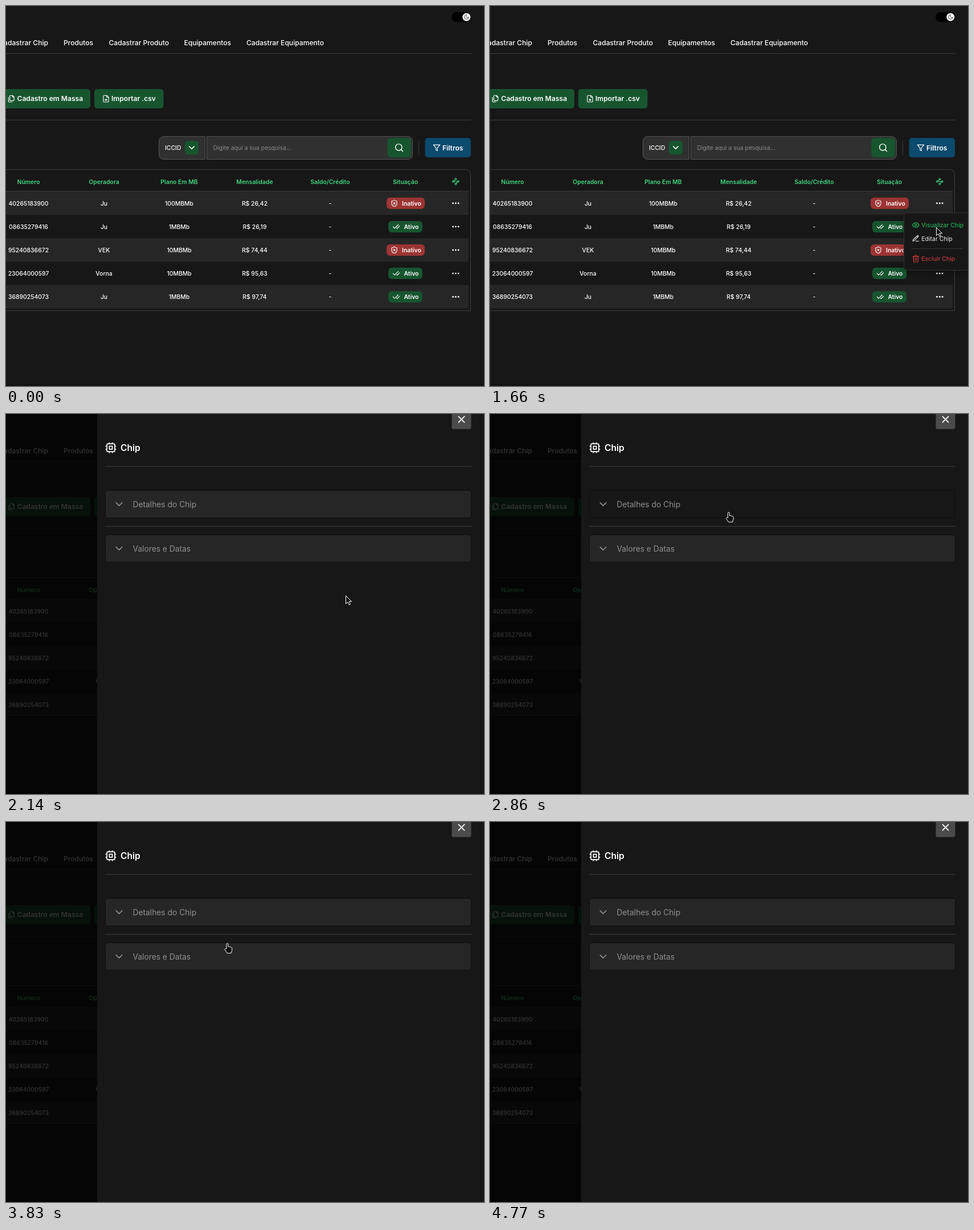
Write an HTML page that moves like this. It is 839x668 px and loops after 5.82 s.

```html
<!DOCTYPE html>
<html lang="pt-BR">
<head>
<meta charset="utf-8">
<title>Chips</title>
<style>
  html, body { margin: 0; width: 100%; height: 100%; overflow: hidden; background: #171717; }
  svg { display: block; font-family: Inter, sans-serif; }
  text { white-space: pre; }
  #menu { filter: drop-shadow(0 4px 5px #0004); }
</style>
</head>
<body>
<svg id="stage" width="839" height="668" viewBox="0 0 839 668"></svg>
<script>
const LOOP = 5820, GREEN = '#17552f', MINT = '#42d67d', LINE = '#3d3d3d';
const DETAILS_HEIGHT = 470, VALUES_HEIGHT = 225, SCROLLBAR = 15;
const $ = id => document.getElementById(id);

// Drawing helpers
const ring = (x, y, r) => `M${x - r} ${y}a${r} ${r} 0 1 0 ${2 * r} 0a${r} ${r} 0 1 0 ${-2 * r} 0`;
const text = (x, cy, str, size = 10.4, weight = 500, fill = '#fff', anchor = 'start', extra = '') =>
  `<text x="${x}" y="${cy + size * .364}" font-size="${size}" font-weight="${weight}" fill="${fill}" text-anchor="${anchor}" ${extra}>${str}</text>`;
const box = (x, y, w, h, fill, r = 0, extra = '') =>
  `<rect x="${x}" y="${y}" width="${w}" height="${h}" rx="${r}" fill="${fill}" ${extra}/>`;
const wide = (x, y, w, h, fill, r = 0, extra = '') => box(x, y, w, h, fill, r, `data-w="${w}" ${extra}`);
const icon = (name, cx, cy, size, color = '#fff', extra = '') =>
  `<g transform="translate(${cx - size / 2} ${cy - size / 2}) scale(${size / 24})"><path d="${ICONS[name]}" fill="none" stroke="${color}" stroke-width="2" stroke-linecap="round" stroke-linejoin="round" ${extra}/></g>`;

const ICONS = {
  chevron: 'm6 9 6 6 6-6',
  close: 'M18 6 6 18M6 6l12 12',
  search: ring(11, 11, 8) + 'M21 21l-4.3-4.3',
  filter: 'M22 3H2l8 9.46V19l4 2v-8.54z',
  eye: 'M2 12s3-7 10-7 10 7 10 7-3 7-10 7-10-7-10-7Z' + ring(12, 12, 3),
  pencil: 'M12 20h9M16.5 3.5a2.12 2.12 0 0 1 3 3L7 19l-4 1 1-4ZM15 5l3 3',
  trash: 'M3 6h18M19 6v14c0 1-1 2-2 2H7c-1 0-2-1-2-2V6M8 6V4c0-1 1-2 2-2h4c1 0 2 1 2 2v2M10 11v6M14 11v6',
  cpu: 'M6 4h12a2 2 0 0 1 2 2v12a2 2 0 0 1-2 2H6a2 2 0 0 1-2-2V6a2 2 0 0 1 2-2ZM9 9h6v6H9zM15 2v2M15 20v2M2 15h2M2 9h2M20 15h2M20 9h2M9 2v2M9 20v2',
  files: 'M20 7h-3a2 2 0 0 1-2-2V2M9 18a2 2 0 0 1-2-2V4a2 2 0 0 1 2-2h7l4 4v10a2 2 0 0 1-2 2ZM3 7.6v12.8A1.6 1.6 0 0 0 4.6 22h9.8',
  download: 'M15 2H6a2 2 0 0 0-2 2v16a2 2 0 0 0 2 2h12a2 2 0 0 0 2-2V7ZM14 2v4a2 2 0 0 0 2 2h4M12 18v-6M9 15l3 3 3-3',
  shield: 'M20 13c0 5-3.5 7.5-8 9-4.5-1.5-8-4-8-9V6a1 1 0 0 1 1-1c2 0 4.5-1.2 7-3 2.5 1.8 5 3 7 3a1 1 0 0 1 1 1zM14.5 9.5l-5 5M9.5 9.5l5 5',
  checks: 'M18 6 7 17l-5-5M22 10l-7.5 7.5L13 16',
  moon: 'M12 3a6 6 0 0 0 9 9 9 9 0 1 1-9-9Z',
  nodes: ring(12, 4.5, 2.5) + ring(4.5, 12, 2.5) + ring(19.5, 12, 2.5) + ring(12, 19.5, 2.5) + 'M10.2 6.3 6.3 10.2M7 12h10M13.8 17.7l3.9-3.9'
};

const COLUMNS = [39.5, 172, 304, 436.5, 569, 701];
const HEADERS = ['Número', 'Operadora', 'Plano Em MB', 'Mensalidade', 'Saldo/Crédito', 'Situação'];
const CHIPS = [
  ['40265183900', 'Ju', '100MBMb', 'R$ 26,42', '-', false],
  ['08635279416', 'Ju', '1MBMb', 'R$ 26,19', '-', true],
  ['95240836672', 'VEK', '10MBMb', 'R$ 74,44', '-', false],
  ['23064000597', 'Vorna', '10MBMb', 'R$ 95,63', '-', true],
  ['36890254073', 'Ju', '1MBMb', 'R$ 97,74', '-', true]
];

function badge(cy, active) {
  return active
    ? box(671, cy - 10, 60, 20, GREEN, 6) + icon('checks', 685, cy, 13.7) + text(698.5, cy, 'Ativo', 10.4, 600)
    : box(668, cy - 10, 67, 20, '#9c3434', 6) + icon('shield', 681.5, cy, 13.7) + text(695, cy, 'Inativo', 10.4, 600);
}

function tableRow(chip, i) {
  const cy = 346.8 + i * 41.1;
  const cells = chip.slice(0, 5).map((value, c) => text(COLUMNS[c], cy, value, 10.4, 500, '#fff', 'middle'));
  const dots = [784.5, 789.3, 794.1].map(x => `<circle cx="${x}" cy="${cy}" r="1.45" fill="#fff"/>`);
  return (i % 2 ? '' : box(0, cy - 20.6, 812, 41, '#262626')) + cells.join('') + badge(cy, chip[5]) + dots.join('');
}

const page = `
  ${box(0, 664, 839, 4, '#131313')}
  ${box(782, 11, 34, 17, '#000', 8.5)}<circle cx="808.3" cy="19.5" r="7" fill="#fff"/>${icon('moon', 808.3, 19.5, 10, '#171717')}
  ${text(74, 65, 'Cadastrar Chip', 12.1, 500, '#fff', 'end')}
  ${text(101, 65, 'Produtos', 12.1)}${text(180.5, 65, 'Cadastrar Produto', 12.1)}
  ${text(312.5, 65, 'Equipamentos', 12.1)}${text(422, 65, 'Cadastrar Equipamento', 12.1)}
  ${box(0, 83, 817, 1, LINE)}${box(0, 200, 816, 1, LINE)}
  ${box(-20, 146, 168, 34, GREEN, 5)}${icon('files', 9.5, 163, 13.7)}${text(19.5, 163, 'Cadastro em Massa', 12.1, 600)}
  ${box(155, 146, 121.5, 34, GREEN, 5)}${icon('download', 175.5, 163, 13.7)}${text(185, 163, 'Importar .csv', 12.1, 600)}
  <g fill="#303030" stroke="#555">
    <path d="M349.5 229.5H276.5a8 8 0 0 0-8 8v24a8 8 0 0 0 8 8h73z"/>
    <path d="M352.5 229.5h353a8 8 0 0 1 8 8v24a8 8 0 0 1-8 8h-353z"/>
  </g>
  ${text(279, 249.5, 'ICCID', 10.4)}${box(314, 237, 24, 24, GREEN, 5)}${icon('chevron', 326, 249, 17)}
  ${text(363.5, 249.7, 'Digite aqui a sua pesquisa...', 10.4, 400, '#8b8b8b')}
  ${box(669.5, 232, 41.5, 34, GREEN, 6)}${icon('search', 690, 249, 17)}
  ${box(724, 236, 1, 27, LINE)}
  ${box(735.5, 232, 80.5, 34, '#0c4a6e', 5)}${icon('filter', 756, 249.3, 13.7)}${text(766, 249.7, 'Filtros', 12.1, 600)}
  <path d="M0 287.5H807.5a8 8 0 0 1 8 8V535.5H0" fill="none" stroke="#404040"/>
  ${box(0, 325, 812, 1, LINE)}
  ${HEADERS.map((h, c) => text(COLUMNS[c], 309, h, 10.4, 600, MINT, 'middle')).join('')}
  ${icon('nodes', 789.3, 308.5, 13.7, MINT)}
  ${CHIPS.map(tableRow).join('')}`;

const menu = `<g id="menu">
  ${box(726.5, 363.5, 130, 101, '#171717', 6, 'stroke="#343434"')}
  <g id="view">${icon('eye', 747.3, 385, 13.7, 'currentColor')}${text(757.3, 385.2, 'Visualizar Chip', 10.5, 400, 'currentColor')}</g>
  ${icon('pencil', 747.3, 408.7, 13.7, '#f0f0f0')}${text(757.3, 409, 'Editar Chip', 10.5, 400, '#f0f0f0')}
  ${box(740, 426, 90, 1, '#383838')}
  ${icon('trash', 747.3, 444, 13.7, '#dc3f3f')}${text(757.3, 444.2, 'Excluir Chip', 10.5, 400, '#dc3f3f')}
</g>`;

const field = ([label, value], i) =>
  text(185, i * 75 + 20, label, 10.4, 500, '#bdbdbd') +
  wide(185.5, i * 75 + 32.5, 620, 34, '#202020', 4, 'stroke="#3a3a3a"') +
  text(196, i * 75 + 50, value, 10.4, 400, '#8f8f8f');

const section = (id, y, title, fields) => `
  ${wide(174.5, y + .5, 642, 48, '#262626', 4, `id="${id}Bar" stroke="#0e0e0e"`)}
  <g id="${id}Arrow">${icon('chevron', 198.5, y + 24.5, 20.6, '#8f8f8f')}</g>
  ${text(222.5, y + 24.7, title, 13.8, 400, '#8f8f8f')}
  <svg id="${id}Body" x="0" y="${y + 49}" width="839" height="0" overflow="hidden">${fields.map(field).join('')}</svg>`;

const sheet = `<g id="sheet">
  ${box(160, 0, 679, 668, '#171717')}
  <g id="close">${box(782.5, -8, 34, 34.5, '#4b4b4b', 3)}${icon('close', 799.5, 9.5, 20.6)}</g>
  ${icon('cpu', 184, 59.3, 20.6)}${text(201, 59.7, 'Chip', 15.6, 600)}
  ${wide(174, 91.5, 643, 1, '#404040')}
  ${section('details', 134, 'Detalhes do Chip', [['ICCID', '-'], ['Número', CHIPS[0][0]], ['Operadora', 'Ju'],
    ['Plano Em MB', '100MBMb'], ['Situação', 'Inativo'], ['Saldo/Crédito', '-']])}
  <g id="below">
    ${wide(174, 197, 643, 1, '#404040')}
    ${section('values', 212, 'Valores e Datas', [['Mensalidade', 'R$ 26,42'], ['Saldo/Crédito', '-'], ['Data', '-']])}
  </g>
  <g id="scrollbar">${box(824, 0, 15, 668, '#2c2c2c')}${box(827, 14, 9, 500, '#9f9f9f', 4.5)}</g>
</g>`;

const pointer = `<g id="pointer" fill="#111" stroke="#fff" stroke-linejoin="round">
  <path id="arrow" d="M.5.5V14.6L3.8 11.5 6.1 16.5 8.4 15.4 6.1 10.6H10.6Z"/>
  <path id="hand" d="M-1.5 10V1.8a1.5 1.5 0 0 1 3 0V6.5a1.4 1.4 0 0 1 2.5.4 1.3 1.3 0 0 1 2.3.6 1.2 1.2 0 0 1 1.9 1V12.5L6.5 17.5H-.3L-4.3 11.7a1.4 1.4 0 0 1 2-1.8Z"/>
</g>`;

$('stage').innerHTML = page + menu + box(0, 0, 839, 668, '#000', 0, 'id="shade"') + sheet + pointer;

// Motion helpers
const ramp = (t, a, b) => Math.min(1, Math.max(0, (t - a) / (b - a)));
const easeOut = (u, power = 3) => 1 - (1 - u) ** power;
const pulse = (t, a, b, c, d) => easeOut(ramp(t, a, b)) - easeOut(ramp(t, c, d));
const set = (id, name, value) => $(id).setAttribute(name, value);

// Pointer stops: time, x, y
const STOPS = [
  [70, 819, 637], [630, 783, 336], [980, 783, 336], [1250, 776, 385], [1390, 783, 389],
  [1760, 783, 389], [2060, 619, 341], [2140, 596, 319], [2290, 596, 319], [2860, 419, 172.5],
  [3640, 419, 172.5], [3830, 388.5, 213], [3940, 388.5, 213], [4020, 388, 222], [4450, 388, 222], [4770, 430, 672]
];

function pointerAt(t) {
  const i = Math.max(1, STOPS.findIndex(s => s[0] > t));
  const [a, x, y] = STOPS[i - 1], [b, x2, y2] = STOPS[i];
  const u = ramp(t, a, b), e = u * u * (3 - 2 * u);
  return [x + (x2 - x) * e, y + (y2 - y) * e];
}

function drawPointer(t) {
  const visible = t >= 70 && t < 4770;
  set('pointer', 'visibility', visible ? 'visible' : 'hidden');
  if (!visible) return;
  const [x, y] = pointerAt(t);
  const onTrigger = t > 2200 ? y > 134 && y < 183 || y >= 212 && y < 261 : t < 1250 && y < 358;
  set('pointer', 'transform', `translate(${x} ${y})`);
  set('hand', 'display', onTrigger ? 'inline' : 'none');
  set('arrow', 'display', onTrigger ? 'none' : 'inline');
}

function drawSection(id, cy, open, height, hover) {
  const level = Math.round(38 - 15 * hover);
  set(id + 'Body', 'height', open * height);
  set(id + 'Arrow', 'transform', `rotate(${180 * open} 198.5 ${cy})`);
  set(id + 'Bar', 'fill', `rgb(${level},${level},${level})`);
}

function draw(t) {
  const shown = pulse(t, 840, 990, 1740, 1880);
  set('menu', 'opacity', shown);
  set('menu', 'transform', t < 1000 ? `translate(${40 * (1 - shown)} ${10 * (1 - shown)}) scale(${.95 + .05 * shown})` : '');
  set('view', 'color', t > 1200 && t < 1700 ? '#22c55e' : '#f0f0f0');

  const slide = easeOut(ramp(t, 1665, 2065), 4);
  set('shade', 'opacity', .8 * easeOut(ramp(t, 1665, 1760)));
  set('sheet', 'opacity', slide);
  set('sheet', 'transform', `translate(${679 * (1 - slide)} 0)`);

  const details = pulse(t, 2910, 3090, 3460, 3660);
  const values = pulse(t, 4090, 4260, 4430, 4620);
  drawSection('details', 158.5, details, DETAILS_HEIGHT, pulse(t, 2760, 2860, 3700, 3820));
  drawSection('values', 236.5, values, VALUES_HEIGHT, pulse(t, 3950, 4060, 4520, 4680));
  set('below', 'transform', `translate(0 ${details * DETAILS_HEIGHT})`);

  const gutter = 261 + details * DETAILS_HEIGHT > 668 ? SCROLLBAR : 0;
  set('scrollbar', 'visibility', gutter ? 'visible' : 'hidden');
  set('close', 'transform', `translate(${-gutter} 0)`);
  for (const el of document.querySelectorAll('[data-w]')) el.setAttribute('width', el.dataset.w - gutter);

  drawPointer(t);
}

const start = performance.now();
function tick() {
  draw((performance.now() - start) % LOOP);
  requestAnimationFrame(tick);
}
tick();
</script>
</body>
</html>
```
